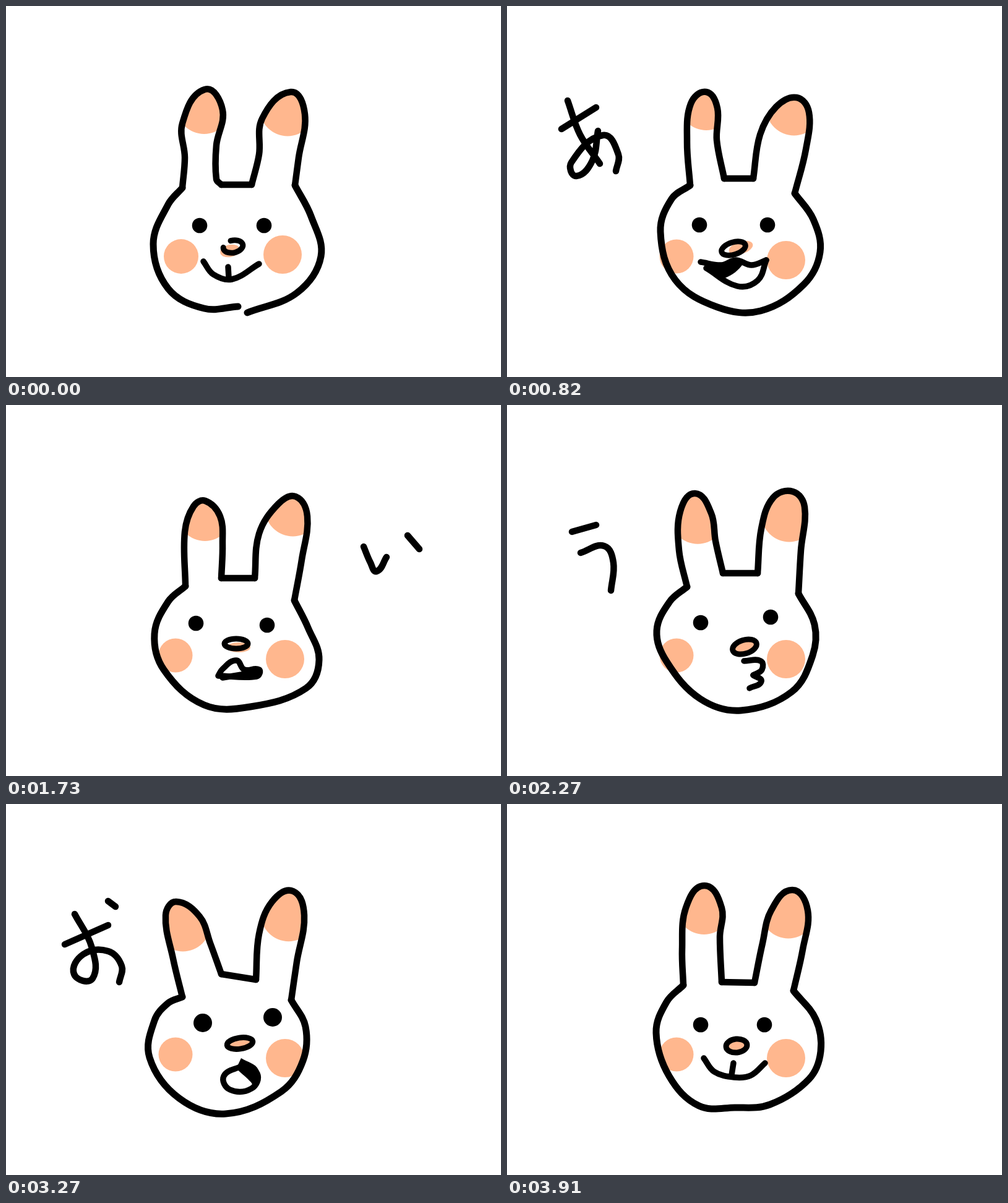
These frames come from a looping animation (800x600 px, 4000 ms). An HTML page with a canvas:

```html
<!DOCTYPE html>
<html lang="ja">
<head>
<meta charset="utf-8">
<title>Rabbit vowels</title>
<style>
html, body { margin: 0; width: 100%; height: 100%; overflow: hidden; background: #fff; }
canvas { display: block; }
</style>
</head>
<body>
<canvas id="stage" width="800" height="600"></canvas>
<script>
const ctx = document.getElementById('stage').getContext('2d');
const PEACH = '#ffb78e';
const LOOP = 4000;

// Shared by every pose unless it says otherwise; circles are [x, y, radius].
const face = {
  cheeks: [[274, 405, 27.5], [451, 411, 31]],
  eyeSize: 12.3,
  smudge: [0, 0],   // how far the nose colour slips from its outline
  noseArc: [0, 2 * Math.PI]
};

// A drawing is a few key points joined by smooth curves; "/" lifts the pen.
// The jaw runs from the end of the right ear to the start of the left one.
const smileA = {
  ...face,
  cheeks: [[283, 405, 28], [447, 402, 31]],
  leftEar: '285,294 289,245 285,190 321,135 350,168 340,225 340,280 348,289',
  rightEar: '397,289 409,240 414,182 460,139 483,175 473,245 467,290',
  jaw: '493,340 509,405 470,464 390,496 / 375,486 320,489 262,457 238,385 262,321',
  tint: 72,
  eyes: [[313, 355], [417, 355]],
  nose: [367, 389, 16, 10, -.2],
  noseArc: [-1.7, 3.3],
  smudge: [-5, 7],
  mouth: '319,413 335,434 365,442 409,417 / 359,422 360,439'
};

const smileB = {
  ...face,
  leftEar: '285,293 283,235 289,168 319,132 347,168 344,215 347,288',
  rightEar: '400,289 413,225 427,172 461,139 486,172 478,235 463,302',
  jaw: '499,348 507,400 488,445 425,486 368,491 310,488 262,440 241,370 258,320',
  tint: 79,
  eyes: [[313, 357], [416, 357]],
  nose: [371, 391, 17, 11, -.1],
  mouth: '318,411 335,433 367,442 394,439 417,419 / 366,419 363,438'
};

const a = {
  ...face,
  leftEar: '296,290 291,220 297,158 322,139 340,165 339,217 351,279',
  rightEar: '398,279 409,208 435,163 468,148 488,172 483,232 465,303',
  jaw: '495,345 506,398 480,450 410,493 340,487 272,443 248,365 266,312',
  tint: 62,
  eyes: [[311, 354], [421, 354]],
  nose: [366, 392, 20, 10, -.3],
  smudge: [12, -1],
  mouth: '313,414 347,419 370,411 395,419 419,411 / 419,411 405,444 372,453 322,424',
  shade: '322,420 370,412 382,416 352,440 335,435',
  kana: '88,199 144,164 / 98,153 118,208 150,255 / 147,202 138,250 112,275 104,253 155,209 180,240 176,267',
  kanaShift: 15
};

const i = {
  ...face,
  leftEar: '290,293 289,205 303,164 322,155 346,180 350,225 348,280',
  rightEar: '402,280 409,208 440,160 468,148 487,180 478,250 466,316',
  jaw: '488,360 506,412 485,458 395,488 320,485 255,428 240,370 262,318',
  tint: 65,
  eyes: [[307, 353], [422, 356]],
  nose: [372, 386, 19, 8, 0],
  smudge: [4, 6],
  mouth: '343,438 350,427 372,413 385,428 409,428 405,439 343,438 / 350,441 405,432',
  kana: '578,229 589,255 599,269 615,246 / 649,211 668,233',
  kanaShift: 13
};

const u = {
  ...face,
  leftEar: '291,294 278,235 280,172 304,143 330,175 337,220 349,272',
  rightEar: '405,272 411,200 430,150 462,140 481,165 475,235 471,305',
  jaw: '497,355 494,405 460,464 378,494 312,475 258,415 242,365 263,318',
  tint: 82,
  eyes: [[313, 352], [426, 343]],
  nose: [384, 391, 20, 11, -.3],
  mouth: '383,414 410,414 412,428 398,437 / 398,437 411,447 392,458',
  kana: '105,205 144,194 / 119,239 157,228 172,255 168,300',
  kanaShift: -6
};

const e = {
  ...face,
  leftEar: '286,300 270,215 267,165 296,143 328,185 336,235 343,273',
  rightEar: '407,283 413,215 430,160 462,145 478,178 466,245 461,310',
  jaw: '484,352 494,388 470,442 380,506 300,493 250,430 248,375 262,338',
  tint: 84,
  eyes: [[315, 353], [427, 345]],
  nose: [379, 389, 22, 9, 0],
  mouth: '380,406 360,424 322,430 318,443 365,444 432,430 425,414 380,406',
  shade: '380,404 436,418 430,433 412,433 378,416',
  kana: '549,161 580,155 / 553,197 583,194 587,230 577,268 / 580,262 605,228 640,246 686,237',
  kanaShift: -3
};

const o = {
  ...face,
  leftEar: '285,312 270,250 258,180 275,158 313,182 330,225 348,275',
  rightEar: '404,284 409,210 430,158 464,141 482,180 470,255 461,317',
  jaw: '484,360 480,415 445,465 355,501 280,476 232,410 240,350 262,322',
  tint: 82,
  eyes: [[318, 354], [431, 345]],
  eyeSize: 15,
  nose: [378, 387, 21, 9, -.15],
  smudge: [-1, 4],
  mouth: '380,424 352,440 362,462 397,460 406,436 380,424',
  shade: '380,411 408,430 402,460 396,450 372,428',
  kana: '95,227 165,196 / 111,178 138,230 140,282 110,275 125,243 165,238 187,262 183,288 / 165,157 177,166',
  kanaShift: 4
};

// Each part ends at step "last"; its drawings alternate step by step.
const timeline = [
  { last: 6, even: smileA, odd: smileB }, { last: 12, odd: a }, { last: 19, odd: i },
  { last: 26, odd: u }, { last: 33, even: e }, { last: 41, even: o },
  { last: 43, even: smileA, odd: smileB }
];

let redraw = false;

// A gentle shift of every point gives the second drawing of a vowel.
function wobble([x, y]) {
  if (!redraw) return [x, y];
  return [x + 3 * Math.sin(x * .021 + y * .035), y + 3 * Math.sin(x * .032 - y * .024 + 2)];
}

const readPoints = text => text.split(' ').map(pair => wobble(pair.split(',').map(Number)));

// The handle at a point is parallel to the line between its neighbours.
function handle(point, from, to, length) {
  const angle = Math.atan2(to[1] - from[1], to[0] - from[0]);
  return [point[0] + length * Math.cos(angle), point[1] + length * Math.sin(angle)];
}

function trace(points) {
  ctx.beginPath();
  ctx.moveTo(...points[0]);
  for (let k = 0; k < points.length - 1; k++) {
    const p = points[k], q = points[k + 1];
    const reach = .36 * Math.hypot(q[0] - p[0], q[1] - p[1]);
    ctx.bezierCurveTo(
      ...handle(p, points[k - 1] || p, q, reach),
      ...handle(q, p, points[k + 2] || q, -reach), ...q);
  }
}

function strokes(text, width) {
  ctx.lineWidth = width;
  for (const part of text.split(' / ')) {
    trace(readPoints(part));
    ctx.stroke();
  }
}

function oval(x, y, rx, ry, turn, color) {
  ctx.beginPath();
  ctx.ellipse(x, y, rx, ry, turn, 0, 2 * Math.PI);
  ctx.fillStyle = color;
  ctx.fill();
}

// Colours the ear from its tip down to the given depth, with a round lower edge.
function tintEar(text, depth) {
  const radius = 45;
  const points = readPoints(text);
  const tip = points.reduce((top, p) => p[1] < top[1] ? p : top);
  const start = points[0], end = points[points.length - 1];
  const base = [(start[0] + end[0]) / 2, (start[1] + end[1]) / 2];
  ctx.save();
  trace(points);
  ctx.clip();
  oval(...handle(tip, tip, base, depth - radius), radius, radius, 0, PEACH);
  ctx.restore();
}

function drawHead({ leftEar, rightEar, jaw, tint }) {
  const first = text => text.split(' ')[0];
  const last = text => text.split(' ').pop();
  tintEar(leftEar, tint);
  tintEar(rightEar, tint);
  strokes(`${leftEar} / ${last(leftEar)} ${first(rightEar)} / ${rightEar}`, 10.5);
  strokes(`${last(rightEar)} ${jaw} ${first(leftEar)}`, 11);
}

function drawNose({ nose: [x, y, rx, ry, turn], smudge, noseArc }) {
  oval(x + smudge[0], y + smudge[1], rx, ry, turn, PEACH);
  ctx.beginPath();
  ctx.ellipse(x, y, rx, ry, turn, ...noseArc);
  ctx.lineWidth = 9;
  ctx.stroke();
}

function drawPose(pose) {
  ctx.fillStyle = '#fff';
  ctx.fillRect(0, 0, 800, 600);
  ctx.lineCap = ctx.lineJoin = 'round';
  pose.cheeks.forEach(([x, y, r]) => oval(x, y, r, r, 0, PEACH));
  drawHead(pose);
  pose.eyes.forEach(([x, y]) => oval(x, y, pose.eyeSize, pose.eyeSize, 0, '#000'));
  drawNose(pose);
  strokes(pose.mouth, 9.5);
  if (pose.shade) {
    trace(readPoints(pose.shade));
    ctx.fillStyle = '#000';
    ctx.fill();
  }
  if (!pose.kana) return;
  ctx.save();
  if (redraw) ctx.translate(pose.kanaShift, 0);
  strokes(pose.kana, 10.5);
  ctx.restore();
}

let shown = -1;
function tick(now) {
  // 11 steps a second, each starting on a whole hundredth.
  const hundredths = Math.floor(now % LOOP / 10);
  const step = Math.ceil((hundredths + .5) * .11) - 1;
  if (step !== shown) {
    shown = step;
    const { even, odd } = timeline.find(part => step <= part.last);
    const own = step % 2 ? odd : even;
    redraw = !own;
    drawPose(own || even || odd);
  }
  requestAnimationFrame(tick);
}
tick(0);
</script>
</body>
</html>
```
